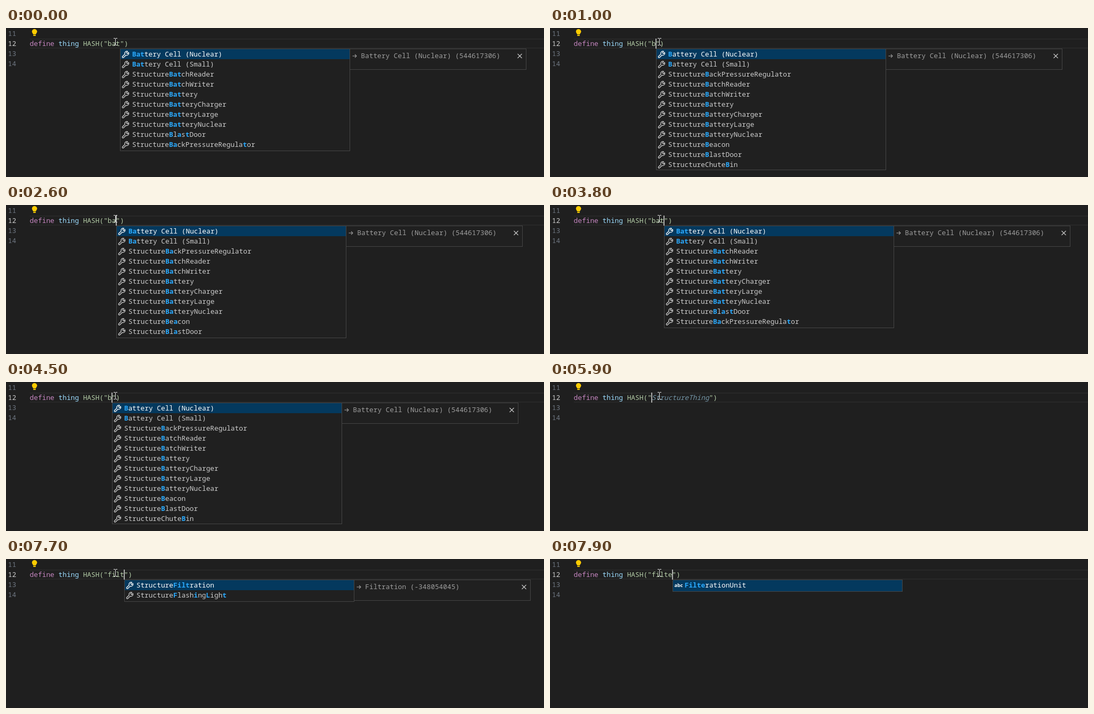
Recreate the animation shown at these times as an HTML page with a canvas. Size 1010 by 282 pixels, loop 8 s.

```html
<!DOCTYPE html>
<html lang="en">
<head>
<meta charset="utf-8">
<title>Editor completion</title>
<style>
html, body { margin: 0; width: 100%; height: 100%; overflow: hidden; background: #1f1f1f; }
canvas { display: block; width: 1010px; height: 282px; }
</style>
</head>
<body>
<canvas id="stage"></canvas>
<script>
const W = 1010, H = 282, LOOP = 8000;
const ROW = 19, CHAR = 7.698, LEFT = 44.6, FIRST = 19;
const SIZE = CHAR / 0.6;
const MONO = `${SIZE}px "Noto Sans Mono", "DejaVu Sans Mono", monospace`;
const C = {
  bg: '#1f1f1f', widget: '#202020', border: '#454545', pick: '#04395e',
  label: '#cccccc', match: '#2aaaff', number: '#6e7681', keyword: '#c586c0',
  name: '#9cdcfe', value: '#b5cea8', ghost: '#7394a5', note: '#9d9d9d'
};

const structures = names => names.split(' ').map(n => 'Structure' + n);
const CATALOG = {
  b: ['Battery Cell (Nuclear)', 'Battery Cell (Small)', ...structures(
    'BackPressureRegulator BatchReader BatchWriter Battery BatteryCharger ' +
    'BatteryLarge BatteryNuclear Beacon BlastDoor ChuteBin')],
  f: structures('Filtration FlashingLight FridgeSmall FuelTank Furnace ' +
    'AdvancedFurnace ArcFurnace SolidFuelGenerator')
};
const NOTES = {
  b: 'Battery Cell (Nuclear) (544617306)',
  f: 'Filtration (-348054045)'
};

// start ms, typed text, caret visible, what else is shown, list limit
const STEPS = [
  [0, 'bat', 0, 'list'], [300, 'bat', 1, 'list'], [500, 'ba', 1, 'list'],
  [1000, 'b', 1, 'list'], [1400, 'b', 0, 'list'],
  [1600, '', 1, ''], [1700, '', 1, 'ghost'], [2100, '', 0, 'ghost'],
  [2400, 'b', 1, ''], [2500, 'b', 1, 'list'], [2600, 'ba', 1, 'list'],
  [2900, 'bat', 1, 'list'], [3300, 'bat', 0, 'list'], [3800, 'bat', 1, 'list'],
  [4200, 'ba', 1, 'list'], [4500, 'b', 1, 'list'],
  [4900, '', 1, ''], [5000, '', 1, 'ghost'], [5400, '', 0, 'ghost'], [5900, '', 1, 'ghost'],
  [6100, 'f', 1, 'list'], [6300, 'fi', 1, 'list'], [6500, 'fil', 1, 'list'],
  [6700, 'file', 1, 'word'], [7200, 'file', 0, 'word'],
  [7400, 'fil', 1, 'list', 2], [7700, 'filt', 1, 'list'],
  [7800, 'filte', 1, ''], [7900, 'filte', 1, 'word']
];

const canvas = document.getElementById('stage');
const ctx = canvas.getContext('2d');
const scale = window.devicePixelRatio || 1;
canvas.width = W * scale;
canvas.height = H * scale;

function rect(x, y, w, h, color) {
  ctx.fillStyle = color;
  ctx.fillRect(x, y, w, h);
}

function frame(x, y, w, h) {
  rect(x, y, w, h, C.border);
  rect(x + 1, y + 1, w - 2, h - 2, C.widget);
}

function text(str, x, y, color, style = '') {
  ctx.font = style + ' ' + MONO;
  ctx.fillStyle = color;
  ctx.fillText(str, x, y);
}

function line(points, color, width) {
  ctx.beginPath();
  points.forEach(([x, y]) => ctx.lineTo(x, y));
  ctx.strokeStyle = color;
  ctx.lineWidth = width;
  ctx.stroke();
}

// Positions of the query's letters in a label, starting at a capital.
function match(query, label) {
  const low = label.toLowerCase();
  const start = label.indexOf(query[0].toUpperCase());
  if (start < 0) return null;
  const hits = [start];
  for (const ch of query.slice(1)) {
    const at = low.indexOf(ch, hits[hits.length - 1] + 1);
    if (at < 0) return null;
    hits.push(at);
  }
  return hits;
}

function search(query, limit) {
  const span = hits => hits[hits.length - 1] - hits[0];
  return CATALOG[query[0]]
    .map(label => ({ label, hits: match(query, label) }))
    .filter(item => item.hits)
    .sort((a, b) => span(a.hits) - span(b.hits))
    .slice(0, limit);
}

function label({ label, hits }, x, y, color) {
  for (let i = 0; i < label.length;) {
    const hit = hits.includes(i);
    let end = i + 1;
    while (end < label.length && hits.includes(end) === hit) end++;
    text(label.slice(i, end), x + i * CHAR, y, hit ? C.match : color, hit ? 'bold' : '');
    i = end;
  }
}

function wrench(x, y, color) {
  ctx.save();
  ctx.translate(x, y);
  ctx.strokeStyle = color;
  ctx.lineWidth = 1.25;
  ctx.lineJoin = 'round';
  ctx.beginPath();
  ctx.moveTo(10.9, 1.2);
  ctx.bezierCurveTo(7.6, 0, 4.6, 2.8, 5.7, 6.2);
  ctx.lineTo(1.2, 10.7);
  ctx.bezierCurveTo(0, 12.3, 1.7, 14, 3.3, 12.8);
  ctx.lineTo(7.8, 8.3);
  ctx.bezierCurveTo(11.2, 9.4, 14, 6.4, 12.8, 3.1);
  ctx.lineTo(10.4, 5.5);
  ctx.lineTo(8.5, 3.6);
  ctx.closePath();
  ctx.stroke();
  ctx.restore();
}

function bulb() {
  ctx.fillStyle = '#ffcc00';
  ctx.beginPath();
  ctx.arc(53.5, 6.8, 4.8, Math.PI * 0.78, Math.PI * 2.22);
  ctx.lineTo(55.9, 12);
  ctx.lineTo(51.1, 12);
  ctx.fill();
  rect(51.2, 12.8, 4.6, 2.2, '#ffcc00');
}

function pointer() {
  const color = '#e4e4e4';
  rect(205, 20, 1, 12, color);
  for (const y of [19, 32]) {
    rect(202, y, 3, 1, color);
    rect(206, y, 3, 1, color);
  }
}

function details(x, note) {
  frame(x, 39, 332, 40);
  line([[x + 5.5, 53], [x + 13, 53]], C.note, 1.1);
  line([[x + 10, 50], [x + 13, 53], [x + 10, 56]], C.note, 1.1);
  text(note, x + 21.3, 57, C.note);
  const cx = x + 319.5;
  line([[cx - 4, 49], [cx + 4, 57]], C.label, 1.1);
  line([[cx + 4, 49], [cx - 4, 57]], C.label, 1.1);
}

function popup(x, items, isWord) {
  const height = Math.min(items.length * ROW + 4, 12 * ROW + 2);
  frame(x, 39, 432, height);
  rect(x + 1, 40, 430, items.length === 1 ? height - 2 : ROW, C.pick);
  items.forEach((item, i) => {
    const y = 40 + i * ROW, color = i ? C.label : '#ffffff';
    if (isWord) {
      ctx.font = 'bold 9px "Open Sans", sans-serif';
      ctx.fillStyle = color;
      ctx.fillText('abc', x + 3.5, y + 13);
    } else {
      wrench(x + 3.5, y + 3, color);
    }
    label(item, x + 22.7, y + 14, color);
  });
}

function editor(typed, ghost) {
  rect(0, 0, W, H, C.bg);
  for (const y of [20, 37]) rect(45, y, W - 45, 2, '#282828');
  for (let i = 0; i < 4; i++) {
    text(String(11 + i), 3.8, 15 + i * ROW, i === 1 ? C.label : C.number);
  }
  const put = (str, col, color, style) => text(str, LEFT + col * CHAR, 34, color, style);
  put('define', 0, C.keyword);
  put('thing', 7, C.name);
  put('HASH("' + typed, 13, C.value);
  put(ghost, FIRST, C.ghost, 'italic');
  put('")', FIRST + typed.length + ghost.length, C.value);
  bulb();
}

function draw(time) {
  const [, typed, caret, extra, limit] = STEPS.filter(step => step[0] <= time).pop();
  const caretX = Math.floor(LEFT + (FIRST + typed.length) * CHAR);
  ctx.setTransform(scale, 0, 0, scale, 0, 0);
  editor(typed, extra === 'ghost' ? 'StructureThing' : '');
  if (caret) rect(caretX, 20, 2, ROW, '#aeafad');
  const x = caretX + 1;
  if (extra === 'list') {
    details(x + 431, NOTES[typed[0]]);
    popup(x, search(typed, limit), false);
  } else if (extra === 'word') {
    const word = 'FilterationUnit';
    popup(x, [{ label: word, hits: match(typed, word) }], true);
  }
  pointer();
}

const begin = performance.now();
function tick() {
  draw((performance.now() - begin) % LOOP);
  requestAnimationFrame(tick);
}
tick();
</script>
</body>
</html>
```
